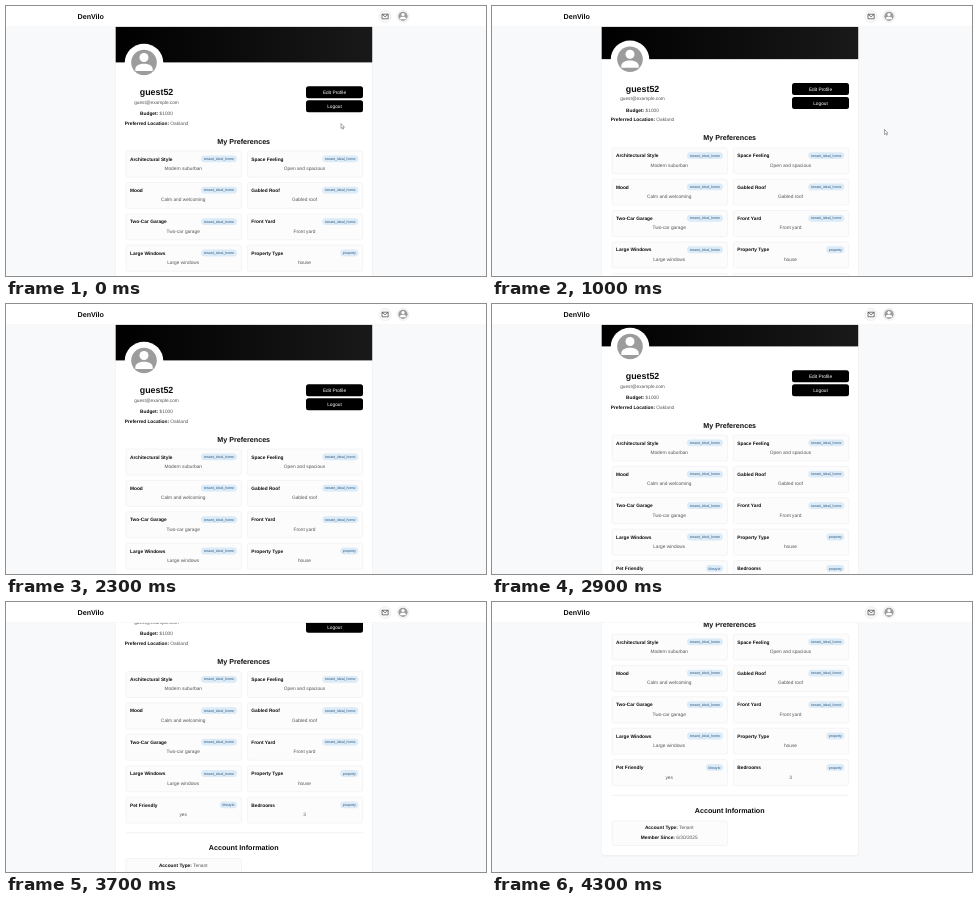
Recreate the animation shown at these times as an HTML page. Size 480 by 270 pixels, loop 4.4 s.

```html
<!DOCTYPE html>
<html lang="en">
<head>
<meta charset="utf-8">
<style>
html, body { margin: 0; width: 100%; height: 100%; overflow: hidden; background: #f8f9fa; }
svg { display: block; width: 480px; height: 270px; font-family: "Liberation Sans", Arial, sans-serif; text-rendering: geometricPrecision; }
.b { font-weight: bold; fill: #0c0c0c; }
.v { fill: #555; }
.mid { text-anchor: middle; }
.box { fill: #fcfcfd; stroke: #eaebed; stroke-width: .5; }
</style>
</head>
<body>
<svg id="stage" viewBox="0 0 480 270">
  <defs>
    <linearGradient id="banner">
      <stop offset="0" stop-color="#000"/>
      <stop offset="1" stop-color="#191919"/>
    </linearGradient>
    <g id="person">
      <circle r="12.8" fill="#9c9c9c"/>
      <circle cy="-5" r="4.5" fill="#fff"/>
      <path d="M-8.7 8.5V6.5C-8.7 3-4 1.3 0 1.3S8.7 3 8.7 6.5V8.5Z" fill="#fff"/>
    </g>
  </defs>
  <rect width="480" height="270" fill="#f8f9fa"/>
  <g id="page"></g>
  <g id="header">
    <rect y="20" width="480" height=".8" fill="#f0f1f2"/>
    <rect width="480" height="20.5" fill="#fff"/>
    <text class="b" x="71.5" y="13" font-size="7.15">DenVilo</text>
    <g fill="#f8f9fa" stroke="#e4e5e7" stroke-width=".6">
      <circle cx="379" cy="10.5" r="6"/>
      <circle cx="397" cy="10.3" r="6"/>
    </g>
    <path d="M376 8.2h6.2v4.6h-6.2zl3.1 2.6 3.1-2.6" fill="none" stroke="#444" stroke-width=".7"/>
    <use href="#person" transform="translate(397 10.3) scale(.36)"/>
  </g>
  <path id="cursor" d="M0 0V5L1.2 4 2 5.7 2.8 5.3 2.1 3.7H3.5Z" fill="#fff" stroke="#555" stroke-width=".5"/>
</svg>
<script>
const LOOP = 4400, STEP = 100;
const $ = id => document.getElementById(id);

const text = (s, x, y, size, cls) =>
  `<text class="${cls}" x="${x}" y="${y + size * .36}" font-size="${size}">${s}</text>`;
const pair = (label, value, x, y) =>
  text(`<tspan class="b">${label}:</tspan> ${value}`, x, y, 4.8, 'v mid');
const box = (x, y, w, h) =>
  `<rect class="box" x="${x}" y="${y}" width="${w}" height="${h}" rx="2"/>`;
const button = (label, y) =>
  `<rect x="300" y="${y - 6}" width="57" height="12" rx="2.5"/>` +
  `<text class="mid" x="328.5" y="${y + 1.7}" font-size="4.8" fill="#fff">${label}</text>`;

const pillWidth = { tenant_ideal_home: 36, property: 18, lifestyle: 17 };

function preference([title, value, tag = 'tenant_ideal_home'], i) {
  const x = 120 + i % 2 * 121.3, y = 145 + (i >> 1) * 31.4, w = pillWidth[tag];
  return box(x, y, 115.5, 26) +
    text(title, x + 4, y + 7.8, 4.8, 'b') +
    `<rect x="${x + 111 - w}" y="${y + 4.4}" width="${w}" height="6.8" rx="3.4" fill="#dcebf8"/>` +
    `<text class="mid" x="${x + 111 - w / 2}" y="${y + 8.9}" font-size="3.55" fill="#2c5578">${tag}</text>` +
    text(value, x + 57.2, y + 17.2, 4.8, 'v mid');
}

const preferences = [
  ['Architectural Style', 'Modern suburban'], ['Space Feeling', 'Open and spacious'],
  ['Mood', 'Calm and welcoming'], ['Gabled Roof', 'Gabled roof'],
  ['Two-Car Garage', 'Two-car garage'], ['Front Yard', 'Front yard'],
  ['Large Windows', 'Large windows'], ['Property Type', 'house', 'property'],
  ['Pet Friendly', 'yes', 'lifestyle'], ['Bedrooms', '3', 'property']
];

$('page').innerHTML =
  '<rect x="109" y="10" width="258" height="357.5" rx="4" fill="#f0f1f2"/>' +
  '<rect x="109.7" y="10" width="256.5" height="356" rx="3.5" fill="#fff"/>' +
  '<rect x="109.7" y="10" width="256.5" height="46.4" fill="url(#banner)"/>' +
  '<circle cx="138" cy="57" r="19.3" fill="#fff"/>' +
  '<use href="#person" x="138" y="56.5"/>' +
  text('guest52', 150.5, 85.7, 8.9, 'b mid') +
  text('guest@example.com', 150.5, 95.8, 4.75, 'v mid') +
  pair('Budget', '$1000', 150.5, 107.2) +
  pair('Preferred Location', 'Oakland', 150.5, 117) +
  button('Edit Profile', 86.2) + button('Logout', 100.3) +
  text('My Preferences', 237.7, 135, 7.15, 'b mid') +
  preferences.map(preference).join('') +
  '<path d="M120 306.3H357" stroke="#e6e7e9" stroke-width=".6"/>' +
  text('Account Information', 237.7, 321, 7.15, 'b mid') +
  box(120, 332, 115.5, 24.5) +
  pair('Account Type', 'Tenant', 177.2, 338.7) +
  pair('Member Since', '6/30/2025', 177.2, 348.5);

// [time, value] pairs, joined linearly
const scrollKeys = [[0, 0], [200, 0], [300, 1], [600, 4], [900, 4], [1300, 1], [1600, 1],
  [1800, 0], [2400, 0], [2600, 3], [2900, 14], [3200, 34.5], [3700, 75.5], [4000, 97], [4300, 113]];
const moveKeys = [[0, 0], [200, 0], [500, 1], [4300, 1]];

function at(keys, t) {
  const i = Math.max(1, keys.findIndex(k => k[0] >= t));
  const [t0, a] = keys[i - 1], [t1, b] = keys[i];
  return a + (b - a) * (t - t0) / (t1 - t0);
}

function draw(now) {
  const t = Math.floor(now % LOOP / STEP) * STEP;
  const move = at(moveKeys, t);
  $('page').setAttribute('transform', `translate(0 ${-at(scrollKeys, t)})`);
  $('cursor').setAttribute('transform', `translate(${335 + 57.5 * move} ${117.5 + 6 * move})`);
  $('cursor').style.display = t < 1700 ? '' : 'none';
}

const start = performance.now();
function tick() {
  draw(performance.now() - start);
  requestAnimationFrame(tick);
}
tick();
</script>
</body>
</html>
```
